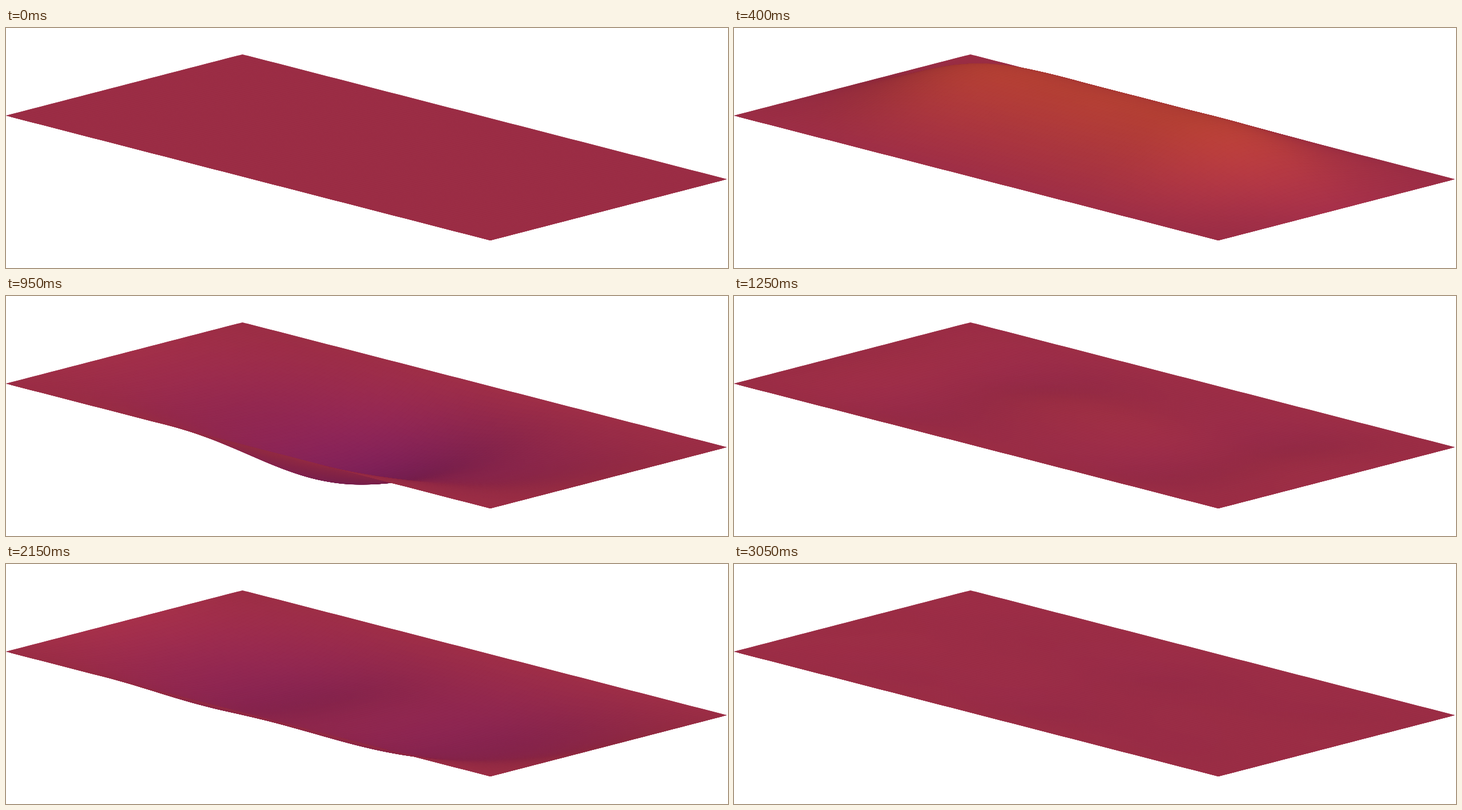
Recreate the animation shown at these times as an HTML page with a canvas. Size 1200 by 400 pixels, loop 3.2 s.

```html
<!DOCTYPE html>
<html lang="en">
<head>
<meta charset="utf-8">
<title>Vibrating membrane</title>
<style>
html, body { margin: 0; width: 100%; height: 100%; overflow: hidden; background: #fff; }
canvas { display: block; }
</style>
</head>
<body>
<canvas id="stage" width="1200" height="400"></canvas>
<script>
const ctx = document.getElementById('stage').getContext('2d');

const LOOP = 3200, STEP = 50, LAST = 3050;
const NU = 120, NV = 60, ROW = NV + 1;
const ASPECT = 805 / 393;
const PERIOD = 1170, PUSH = 200, DAMPING = 0.00014, HEIGHT = 102;
const ODD = [1, 3, 5, 7];
const LIGHT = [0.9, 0.25, 0.35];

const sines = n => ODD.map(k =>
  Float64Array.from({ length: n + 1 }, (_, i) => Math.sin(k * Math.PI * i / n)));
const sinU = sines(NU), sinV = sines(NV);

const size = (NU + 1) * ROW;
const h = new Float64Array(size), px = new Float64Array(size), py = new Float64Array(size);

// Each mode of the clamped sheet answers a short uniform push.
const base = 2 * Math.PI / PERIOD;
const modes = [];
ODD.forEach((m, a) => ODD.forEach((n, b) => {
  const w = base * Math.hypot(m / ASPECT, n) / Math.hypot(1 / ASPECT, 1);
  modes.push({ a, b, w, gain: base / (m * n * w * w * PUSH) });
}));

function amplitude({ w, gain }, t) {
  const rise = 1 - Math.cos(w * t);
  const fall = t > PUSH ? 1 - Math.cos(w * (t - PUSH)) : 0;
  return gain * (rise - fall);
}

function deform(t) {
  const scale = HEIGHT * Math.exp(-DAMPING * t);
  const amps = modes.map(mode => scale * amplitude(mode, t));
  for (let i = 0; i <= NU; i++) {
    const across = ODD.map(() => 0);
    modes.forEach(({ a, b }, k) => { across[b] += amps[k] * sinU[a][i]; });
    for (let j = 0; j <= NV; j++) {
      const p = i * ROW + j, u = i / NU, v = j / NV;
      h[p] = across.reduce((sum, c, b) => sum + c * sinV[b][j], 0);
      px[p] = 393 + 805 * u - 393 * v;
      py[p] = 44 + 208 * u + 102 * v - h[p];
    }
  }
}

function colour(p) {
  const right = p + ROW, front = p + 1, both = right + 1;
  const d = (h[p] + h[right] + h[front] + h[both]) / 4 / 105;
  const su = (h[right] + h[both] - h[p] - h[front]) / 2 * NU / 1099;
  const sv = (h[front] + h[both] - h[p] - h[right]) / 2 * NV / 537;
  const facing = (LIGHT[2] - su * LIGHT[0] - sv * LIGHT[1]) / Math.hypot(su, sv, 1);
  const shade = 0.825 + 0.25 * (facing - LIGHT[2]);
  const tone = (mid, slope, bend) => Math.round(shade * (mid + d * (slope + d * bend)));
  return `rgb(${tone(188, 37, -4)},${tone(55, 21.5, 4.5)},${tone(84, -22.5, -3.5)})`;
}

function draw(t) {
  deform(t);
  ctx.fillStyle = '#fff';
  ctx.fillRect(0, 0, 1200, 400);
  // Cells run back to front and reach under the next one, so no seams show.
  for (let i = 0; i < NU; i++) {
    const i2 = Math.min(i + 2, NU);
    for (let j = 0; j < NV; j++) {
      const j2 = Math.min(j + 2, NV);
      const p = i * ROW + j;
      ctx.fillStyle = colour(p);
      ctx.beginPath();
      for (const q of [p, i2 * ROW + j, i2 * ROW + j2, i * ROW + j2]) ctx.lineTo(px[q], py[q]);
      ctx.fill();
    }
  }
}

const start = performance.now();
let shown = -1;

function tick() {
  const time = (performance.now() - start) % LOOP;
  const t = Math.min(Math.floor(time / STEP) * STEP, LAST);
  if (t !== shown) draw(shown = t);
  requestAnimationFrame(tick);
}
tick();
</script>
</body>
</html>
```
